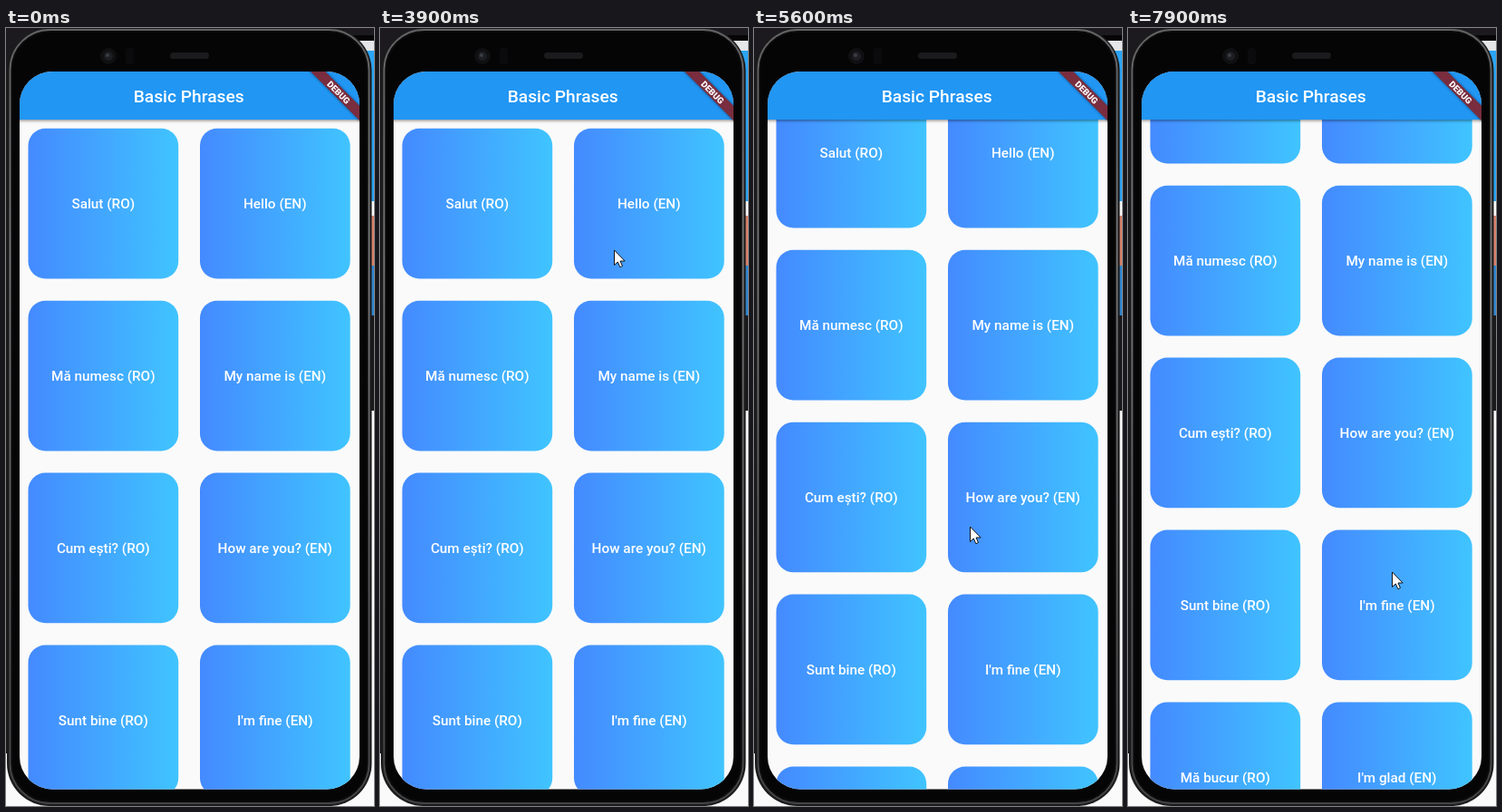
Write an HTML page that moves like this. It is 406 px wide and 858 px high and loops after 8000 ms.

```html
<!DOCTYPE html>
<html lang="en">
<head>
<meta charset="utf-8">
<title>Basic Phrases</title>
<style>
html, body { margin: 0; width: 100%; height: 100%; overflow: hidden; background: #1c1a1e; }
svg { display: block; width: 406px; height: 858px; }
text { font-family: Roboto, sans-serif; font-weight: 500; fill: #fff; text-anchor: middle; }
</style>
</head>
<body>
<svg viewBox="0 0 406 858">
  <defs>
    <linearGradient id="card"><stop stop-color="#448aff"/><stop offset="1" stop-color="#40c4ff"/></linearGradient>
    <linearGradient id="rim" x2="0" y2="1">
      <stop stop-color="#626264"/><stop offset=".3" stop-color="#7a7a7c"/>
      <stop offset=".7" stop-color="#58585a"/><stop offset="1" stop-color="#444446"/>
    </linearGradient>
    <clipPath id="screen"><rect x="15" y="48" width="375" height="791.5" rx="36"/></clipPath>
    <filter id="blur" x="-20%" y="-100%" width="140%" height="300%"><feGaussianBlur stdDeviation="1.6"/></filter>
  </defs>

  <!-- windows behind the phone -->
  <rect width="406" height="858" fill="#1c1a1e"/>
  <path d="M0 800h60v58H0zM360 422h46v436h-46z" fill="#fafafa"/>
  <path d="M380 8h26v6h-26z" fill="#050505"/>
  <path d="M385 14h21v11h-21z" fill="#e4e6e8"/>
  <path d="M395 25h11v166h-11z" fill="#2ba4f4"/>
  <path d="M395 191h11v16h-11z" fill="#fafafa"/>
  <path d="M395 207h11v55h-11z" fill="#d9826a"/>
  <path d="M395 262h11v55h-11z" fill="#3186d0"/>
  <path d="M395 317h11v105h-11z" fill="#19191b"/>

  <!-- phone body -->
  <rect x="1" y="0" width="402.5" height="858" rx="47" fill="#1b1b1c"/>
  <rect x="4.5" y="2" width="396" height="853" rx="44" fill="#0b0b0c" stroke="url(#rim)" stroke-width="1.8"/>
  <rect x="7.5" y="5" width="390" height="847" rx="41" fill="#050506"/>
  <circle cx="113" cy="31" r="9" fill="#101012"/>
  <circle cx="113" cy="31" r="5" fill="#1d1e21"/>
  <circle cx="112" cy="30" r="2" fill="#3b3e45"/>
  <rect x="132" y="22" width="9" height="18" rx="3" fill="#0b0b0d"/>
  <rect x="181" y="27" width="43" height="7" rx="3.5" fill="#1b1b1d"/>

  <g clip-path="url(#screen)">
    <rect x="15" y="48" width="375" height="792" fill="#fafafa"/>
    <g id="list" font-size="15.3"></g>
    <rect x="11" y="50" width="383" height="52.5" opacity=".4" filter="url(#blur)"/>
    <rect x="15" y="48" width="375" height="53" fill="#2196f3"/>
    <text x="201.7" y="81.7" font-size="19.2">Basic Phrases</text>
    <g transform="translate(390 48) rotate(45)">
      <rect x="-42" y="26.7" width="84" height="11.5" opacity=".5" filter="url(#blur)"/>
      <rect x="-42" y="26.7" width="84" height="11.5" fill="#792d3e"/>
      <text y="36" font-size="9.7" style="font-weight:900">DEBUG</text>
    </g>
  </g>
  <path id="cursor" d="M0 0V16.5L3.8 13L6.3 18.7L9 17.5L6.5 12H11.7Z" fill="#fff" stroke="#111"/>
</svg>
<script>
const list = document.getElementById('list');
const cursor = document.getElementById('cursor');

const phrases = [
  ['Salut', 'Hello'],
  ['Mă numesc', 'My name is'],
  ['Cum ești?', 'How are you?'],
  ['Sunt bine', "I'm fine"],
  ['Mă bucur', "I'm glad"]
];
list.innerHTML = phrases.map((pair, row) => pair.map((phrase, col) => {
  const x = 24.5 + col * 189.5, y = 110.8 + row * 189.9;
  return `<rect x="${x}" y="${y}" width="165.7" height="165.7" rx="19" fill="url(#card)"/>
    <text x="${x + 82.8}" y="${y + 88.4}">${phrase} (${col ? 'EN' : 'RO'})</text>`;
}).join('')).join('');

// time, x, y
const path = [
  [2000, 406, 720], [2500, 145.5, 240], [3100, 145.5, 240], [3700, 258.5, 245],
  [4100, 258.5, 245], [4600, 290, 430], [5200, 288.5, 500], [5600, 238.5, 550],
  [5900, 146.5, 631], [6700, 146.5, 631], [7400, 291.5, 600], [8000, 291.5, 600]
];

const ease = u => {
  u = Math.min(1, Math.max(0, u));
  return u * u * (3 - 2 * u);
};

function draw(now) {
  const t = Math.floor(now % 8000 / 100) * 100;
  list.setAttribute('transform', `translate(0 ${-127 * ease((t - 5288) / 678)})`);

  cursor.style.display = t < path[0][0] ? 'none' : '';
  const i = Math.max(1, path.findIndex(p => p[0] > t));
  const [t0, x0, y0] = path[i - 1], [t1, x1, y1] = path[i];
  const u = ease((t - t0) / (t1 - t0));
  cursor.setAttribute('transform', `translate(${x0 + (x1 - x0) * u} ${y0 + (y1 - y0) * u})`);
}

const start = performance.now();
function tick() {
  draw(performance.now() - start);
  requestAnimationFrame(tick);
}
tick();
</script>
</body>
</html>
```
